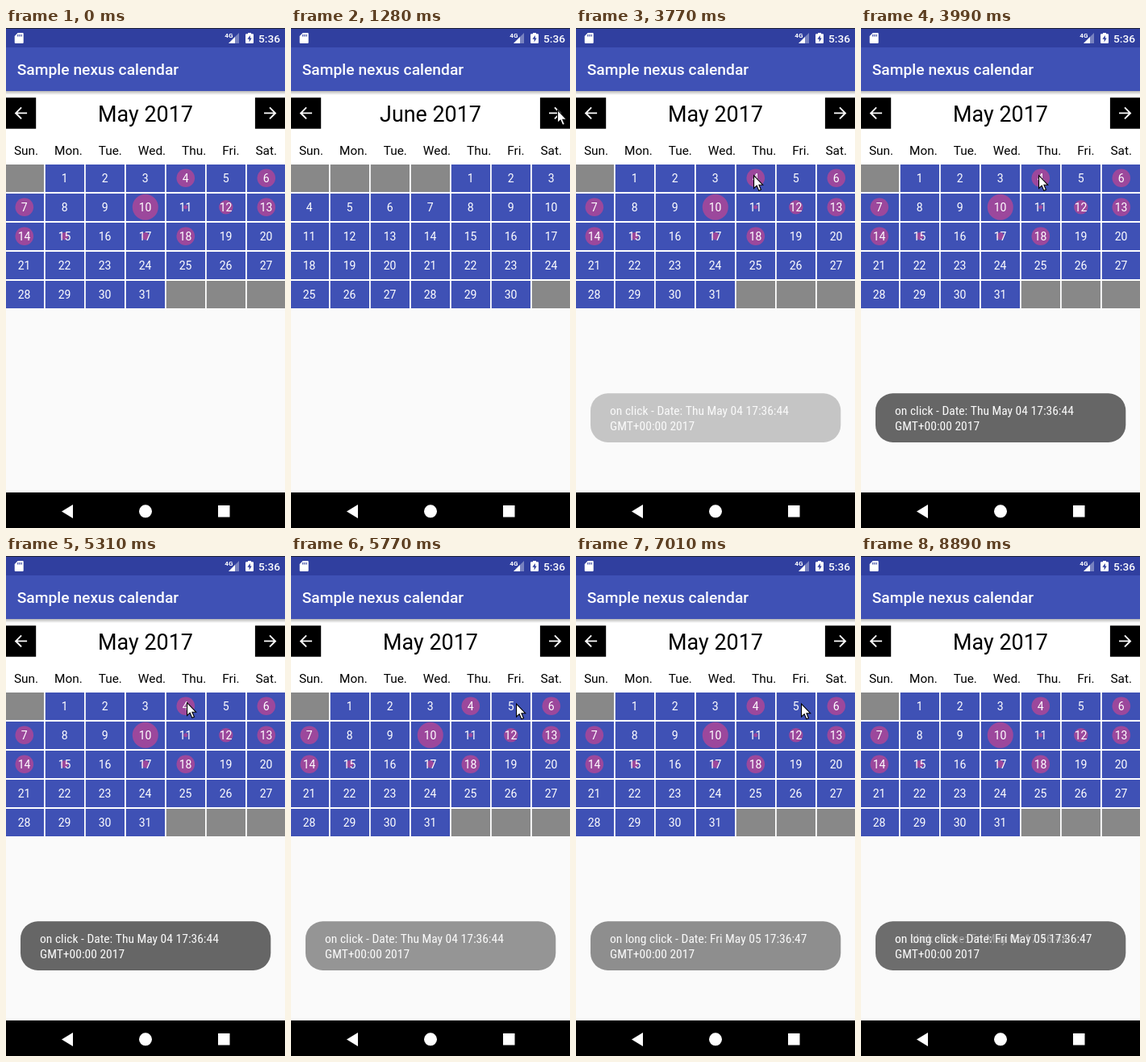
These frames come from a looping animation (346x619 px, 8960 ms). An HTML page with a canvas:

```html
<!DOCTYPE html>
<html lang="en">
<head>
<meta charset="utf-8">
<title>Calendar</title>
<style>
html, body { margin: 0; width: 100%; height: 100%; overflow: hidden; background: #fafafa; }
canvas { display: block; width: 346px; height: 619px; }
</style>
</head>
<body>
<canvas id="stage"></canvas>
<script>
const W = 346, H = 619, LOOP = 8960;
const canvas = document.getElementById('stage');
const ctx = canvas.getContext('2d');
const dpr = window.devicePixelRatio || 1;
canvas.width = W * dpr;
canvas.height = H * dpr;

const SANS = 'Roboto, sans-serif';
const NARROW = '"Roboto Condensed", Roboto, sans-serif';
const BLUE = '#3f51b5', DARK = '#303f9f', WHITE = '#fff';
const WEEK = ['Sun.', 'Mon.', 'Tue.', 'Wed.', 'Thu.', 'Fri.', 'Sat.'];

const MAY = {
  title: 'May 2017', first: 1, days: 31,
  dots: [
    { r: 16, on: [10] },
    { r: 11.3, on: [4, 6, 7, 13, 14, 18] },
    { r: 8.7, on: [12] },
    { r: 4.7, on: [15, 17] },
    { r: 2.5, on: [11] }
  ]
};
const JUNE = { title: 'June 2017', first: 4, days: 30, dots: [] };

const CLICK = 'on click - Date: Thu May 04 17:36:44';
const LONG_CLICK = 'on long click - Date: Fri May 05 17:36:47';
const NEXT_CLICK = 'on click - Date: Fri May 05 17:36:48';
const ZONE = 'GMT+00:00 2017';

const FADES = [
  { start: 3770, end: 3990, steps: 4, from: .36, to: 1 },
  { start: 5690, end: 6000, steps: 5, from: .88, to: .07 },
  { start: 6860, end: 7090, steps: 4, from: .28, to: .95 }
];

const smooth = u => u * u * (3 - 2 * u);
const MOVES = [
  { start: 130, end: 900, steps: 11, from: [265, 593], to: [330, 101], ease: smooth },
  { start: 1600, end: 2140, steps: 8, from: [330, 101], to: [26, 99], ease: smooth, bow: 7 },
  { start: 2370, end: 3210, steps: 12, from: [26, 99], to: [220, 182], ease: smooth },
  { start: 5310, end: 5540, steps: 4, from: [224, 181], to: [279, 182.5], ease: smooth },
  { start: 7790, end: 8020, steps: 4, from: [281, 205], to: [303, 700], ease: u => u }
];
const POINTER_GONE = 8020;

const mix = (a, b, u) => a + (b - a) * u;
const latest = (list, t) => list.filter(item => item.start <= t).pop();

// progress 0..1 in held steps, as the screen was sampled
function progress({ start, end, steps }, t) {
  const k = Math.floor((t - start) / (end - start) * (steps - 1) + .15);
  return Math.min(1, k / (steps - 1));
}

function rect(x, y, w, h, color) {
  ctx.fillStyle = color;
  ctx.fillRect(x, y, w, h);
}

function disc(x, y, r, color) {
  ctx.fillStyle = color;
  ctx.beginPath();
  ctx.arc(x, y, r, 0, Math.PI * 2);
  ctx.fill();
}

function shape(path, x, y, color, sx = 1, sy = sx, line) {
  const outline = new Path2D(path);
  ctx.save();
  ctx.translate(x, y);
  ctx.scale(sx, sy);
  ctx.fillStyle = color;
  ctx.fill(outline);
  if (line) {
    ctx.strokeStyle = line;
    ctx.stroke(outline);
  }
  ctx.restore();
}

function text(str, x, y, size, color, align = 'left', weight = 400) {
  ctx.font = `${weight} ${size}px ${SANS}`;
  ctx.textAlign = align;
  ctx.fillStyle = color;
  ctx.fillText(str, x, y);
}

function drawStatus() {
  rect(0, 0, W, 24, DARK);
  rect(0, 0, W, 1, '#202438');
  shape('M4 0H10Q11 0 11 1V12Q11 13 10 13H1Q0 13 0 12V4Z', 10.7, 6, WHITE);
  for (let i = 0; i < 3; i++) rect(14.2 + i * 2.2, 8, 1.1, 2.6, DARK);
  text('4G', 271.3, 12, 8, WHITE, 'left', 700);
  shape('M13 0V13H0Z', 276, 6, 'rgba(255,255,255,.35)');
  shape('M8 5V13H0Z', 276, 6, WHITE);
  shape('M3 1.3V0H7V1.3H9Q10 1.3 10 2.3V12Q10 13 9 13H1Q0 13 0 12V2.3Q0 1.3 1 1.3Z', 297, 6, WHITE);
  shape('M5.8 3L2.4 7.8H4.6V11.4L7.7 6.4H5.8Z', 297, 6, DARK);
  text('5:36', 313, 17.5, 13.7, WHITE, 'left', 500);
}

function drawToolbar() {
  rect(0, 24, W, 54, BLUE);
  const shadow = ctx.createLinearGradient(0, 78, 0, 83);
  shadow.addColorStop(0, 'rgba(0,0,0,.28)');
  shadow.addColorStop(1, 'rgba(0,0,0,0)');
  rect(0, 78, W, 5, shadow);
  text('Sample nexus calendar', 13.7, 58.4, 19.25, WHITE, 'left', 500);
}

function drawNavigation() {
  rect(0, 575, W, 44, '#000');
  shape('M0 8.5L14 0V17Z', 69, 590, WHITE);
  disc(173, 598.3, 8, WHITE);
  rect(263, 591, 14.5, 14.5, WHITE);
}

function drawButton(x, dir) {
  rect(x - 18.8, 86.2, 37.6, 38.5, '#000');
  shape('M8 -1H-4.2L1.4 -6.6L0 -8L-8 0L0 8L1.4 6.6L-4.2 1H8Z', x, 105.4, WHITE, .96 * dir, .96);
}

// every label gets its own width plus an equal share of the spare room
function drawWeek() {
  ctx.font = `15.4px ${SANS}`;
  const widths = WEEK.map(name => ctx.measureText(name).width);
  const spare = (W - widths.reduce((a, b) => a + b)) / WEEK.length;
  let x = spare / 2;
  WEEK.forEach((name, i) => {
    text(name, x, 157, 15.4, '#000');
    x += widths[i] + spare;
  });
}

function drawMonth(month) {
  text(month.title, 173, 116, 26.9, '#000', 'center');
  for (let i = 0; i < 35; i++) {
    const x = i % 7 * 50 + 22.8, y = Math.floor(i / 7) * 36 + 186;
    const day = i - month.first + 1;
    const used = day > 0 && day <= month.days;
    rect(x - 24, y - 17, 48.2, 34, used ? BLUE : '#888');
    if (!used) continue;
    const dot = month.dots.find(({ on }) => on.includes(day));
    if (dot) disc(x, y - .2, dot.r, '#9c489c');
    text(day, x - .2, y + 5.4, 14, WHITE, 'center');
  }
}

function drawCalendar(month) {
  rect(0, 78, W, 269, WHITE);
  drawButton(18.4, 1);
  drawButton(327.7, -1);
  drawWeek();
  drawMonth(month);
}

function drawToast(t) {
  const fade = latest(FADES, t);
  if (!fade) return;
  ctx.save();
  ctx.globalAlpha = mix(fade.from, fade.to, progress(fade, t));
  ctx.fillStyle = '#666';
  ctx.beginPath();
  ctx.roundRect(18, 452.3, 310.3, 60.7, 21.5);
  ctx.fill();
  ctx.globalAlpha = 1;
  ctx.fontStretch = 'condensed';
  ctx.font = `15.55px ${NARROW}`;
  ctx.textAlign = 'left';
  if (t >= 8890) {
    ctx.fillStyle = 'rgba(255,255,255,.35)';
    ctx.fillText(NEXT_CLICK, 42, 479.4);
  }
  ctx.fillStyle = '#fafafa';
  ctx.fillText(t < 6860 ? CLICK : LONG_CLICK, 42, 479.4);
  ctx.fillText(ZONE, 42, 497.6);
  ctx.restore();
}

function drawPointer(t) {
  const move = latest(MOVES, t);
  if (!move || t >= POINTER_GONE) return;
  const { from, to, ease, bow = 0 } = move;
  const u = ease(progress(move, t));
  const x = mix(from[0], to[0], u);
  const y = mix(from[1], to[1], u) + bow * Math.sin(Math.PI * u);
  shape('M.5 .5V15L3.8 12L6.2 17.6L8.6 16.6L6.3 11.1H10.6Z', x, y, WHITE, 1.1, 1.1, '#000');
}

function draw(t) {
  ctx.setTransform(dpr, 0, 0, dpr, 0, 0);
  rect(0, 0, W, H, '#fafafa');
  drawCalendar(t >= 1280 && t < 2370 ? JUNE : MAY);
  drawStatus();
  drawToolbar();
  drawNavigation();
  drawToast(t);
  drawPointer(t);
}

const begin = performance.now();

function frame(now) {
  draw(Math.max(0, now - begin) % LOOP);
  requestAnimationFrame(frame);
}

frame(begin);
</script>
</body>
</html>
```
